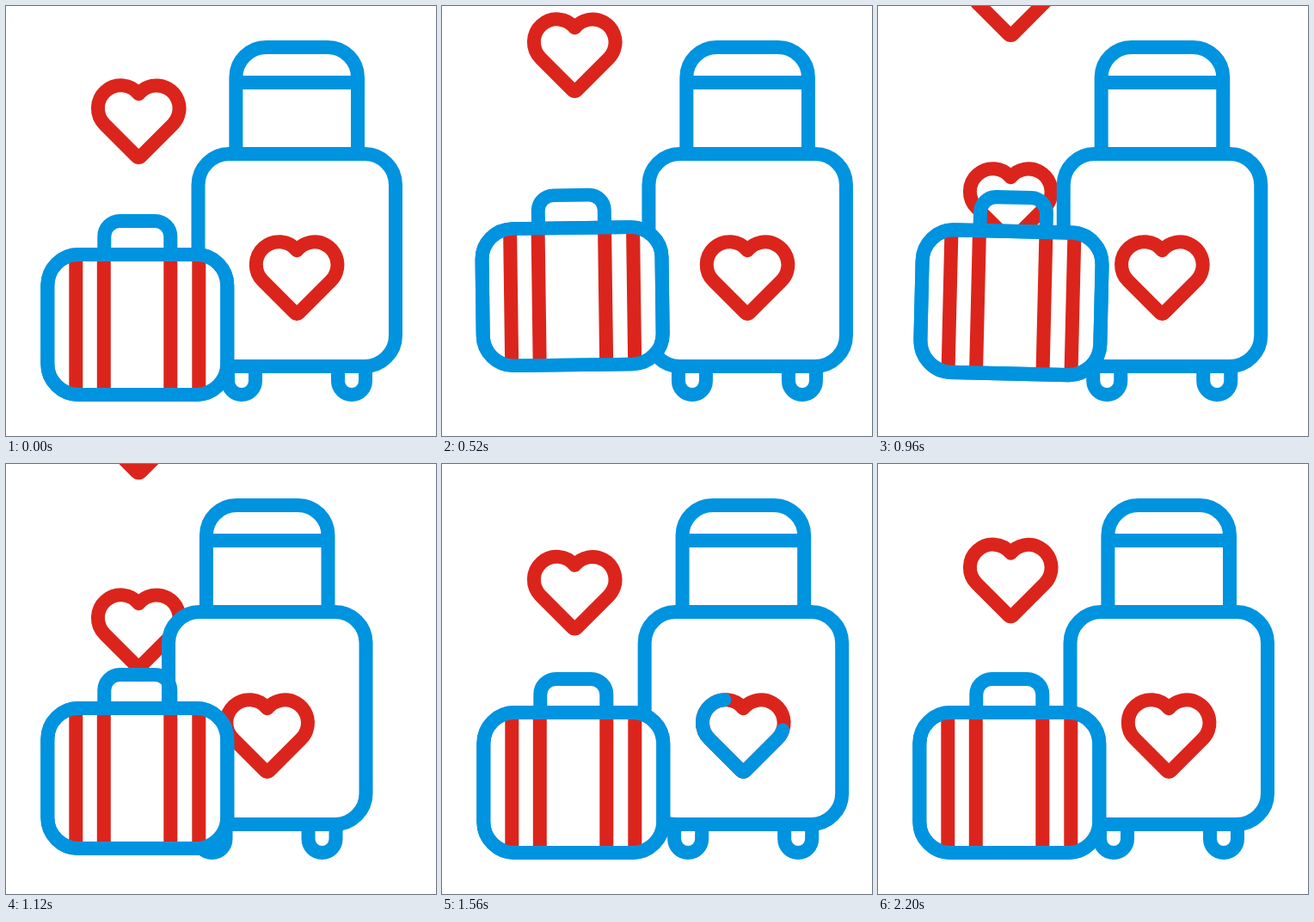
Animation of 500 by 500 pixels, one loop 2.24 s. Source, as an HTML page:

```html
<!DOCTYPE html>
<html lang="en">
<head>
<meta charset="utf-8">
<title>Luggage</title>
<style>
  html, body { margin: 0; width: 100%; height: 100%; overflow: hidden; background: #fff; }
  svg { display: block; width: 100vw; height: 100vh; }
  .line { fill: none; stroke: #0093df; stroke-width: 16; stroke-linecap: round; stroke-linejoin: round; }
  .red { stroke: #db251c; }
  .butt { stroke-linecap: butt; }
  .solid { fill: #fff; }
</style>
</head>
<body>
<svg viewBox="0 0 500 500">
  <defs>
    <path id="heart" d="M45.8 43.4A26.6 26.6 0 0 1 39.5 53.5L2.5 90.5Q0 93 -2.5 90.5L-39.5 53.5A26.6 26.6 0 1 1 0 18A26.6 26.6 0 0 1 45.8 43.4Z"/>
  </defs>

  <use id="leaving" class="line red" href="#heart"/>
  <use id="arriving" class="line red" href="#heart"/>

  <g id="trolley">
    <path class="line butt" d="M267.4 172V83A35 35 0 0 1 302.4 48H374A35 35 0 0 1 409 83V172M267.4 89H409"/>
    <path class="line butt" d="M258 419V436A16 16 0 0 0 290 436V419M386 419V436A16 16 0 0 0 418 436V419"/>
    <rect class="line solid" x="223.5" y="172" width="229.5" height="247" rx="36"/>
    <g transform="translate(338.2 266.2)">
      <use class="line red" href="#heart"/>
      <path id="sweep" class="line" d=""/>
    </g>
  </g>

  <g id="bag">
    <path class="line butt" d="M114 289V268A18 18 0 0 1 132 250H173A18 18 0 0 1 191 268V289"/>
    <rect class="line solid" x="48" y="289" width="209" height="163" rx="36"/>
    <path class="line red butt" d="M81 289V452M113.5 289V452M191 289V452M224 289V452"/>
    <rect class="line" x="48" y="289" width="209" height="163" rx="36"/>
  </g>
</svg>
<script>
const LOOP = 2240, STEP = 40;
const $ = id => document.getElementById(id);

// Rows of [time, value], eased in and out between neighbours.
const slide = [[275, 0], [720, 29.4], [1160, -36], [1600, 13.3], [2040, 0]];
const lift = [[285, 0], [670, -52.5], [1225, 0]];
const stretch = [[0, 1], [280, 0.92], [760, 1.035], [1120, 1]];
const tilt = [[475, 0], [635, -4], [840, 3.9], [1040, 0]];
const sweepEnd = [[1200, 0], [1800, 1]];
const sweepStart = [[1560, 0], [2180, 1]];

function at(keys, t) {
  if (t <= keys[0][0]) return keys[0][1];
  for (let i = 1; i < keys.length; i++) {
    const [t0, v0] = keys[i - 1], [t1, v1] = keys[i];
    if (t < t1) {
      const p = (t - t0) / (t1 - t0);
      return v0 + (v1 - v0) * p * p * (3 - 2 * p);
    }
  }
  return keys[keys.length - 1][1];
}

const sweep = $("sweep");
sweep.setAttribute("d", $("heart").getAttribute("d"));
const length = sweep.getTotalLength();

const place = (id, transform) => $(id).setAttribute("transform", transform);
const show = (el, on) => el.setAttribute("visibility", on ? "visible" : "hidden");

function draw(t) {
  place("leaving", `translate(154.3 ${84.3 - 0.148 * t})`);
  place("arriving", `translate(154.3 ${83.1 + 61.2 * Math.exp((1120 - t) / 339)})`);
  show($("arriving"), t >= 800);

  place("trolley", `translate(${at(slide, t)} 0)`);
  place("bag", `translate(152.8 ${460 + at(lift, t)}) rotate(${at(tilt, t)})`
    + ` scale(1 ${at(stretch, t)}) translate(-152.5 -460)`);

  const from = at(sweepStart, t) * length, to = at(sweepEnd, t) * length;
  show(sweep, to - from > 0.01);
  sweep.setAttribute("stroke-dasharray", `0 ${from} ${Math.max(0, to - from)} ${length * 2}`);
}

const start = performance.now();
function tick() {
  const t = Math.max(0, performance.now() - start);
  draw(Math.floor(t / STEP) * STEP % LOOP);
  requestAnimationFrame(tick);
}
tick();
</script>
</body>
</html>
```
